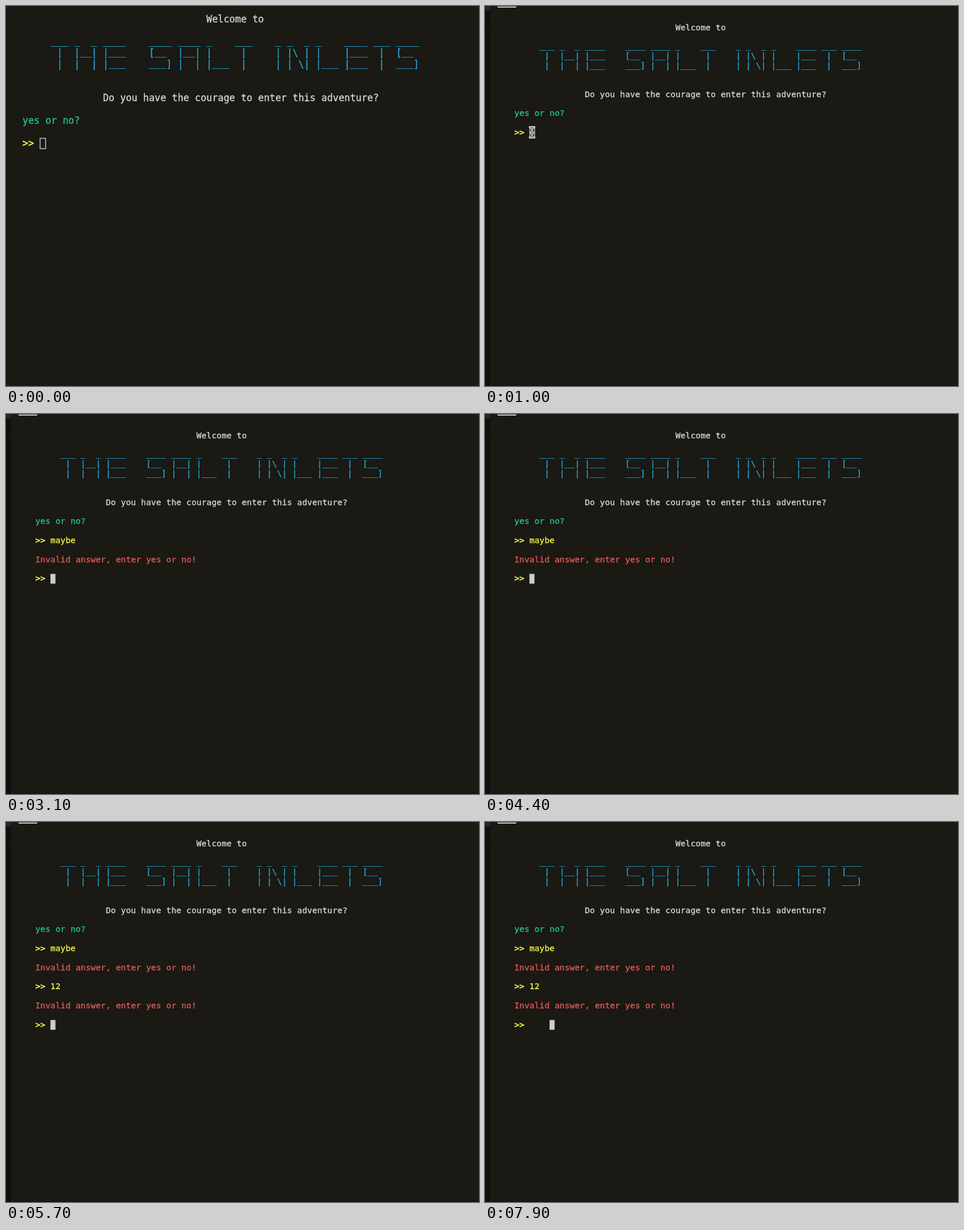
An HTML page with a canvas that plays this animation: 834x671 px, repeating every 8 s.

```html
<!DOCTYPE html>
<html lang="en">
<head>
<meta charset="utf-8">
<title>Text adventure</title>
<style>
html, body { margin: 0; width: 100%; height: 100%; overflow: hidden; background: #1a1914; }
canvas { display: block; }
</style>
</head>
<body>
<canvas id="stage" width="834" height="671"></canvas>
<script>
const LOOP = 8000;
const ctx = document.getElementById("stage").getContext("2d");
const BG = "#1a1914", WHITE = "#d8d8d6", CYAN = "#25a8d6";
const GREEN = "#24c88a", YELLOW = "#f2f045", RED = "#e25a57";

// Character grids: origin, first baseline, cell size and font size.
const ZOOMED = { x: 29, y: 29.4, w: 10.135, h: 19.86, size: 16.83 };
const NORMAL = { x: 51.7, y: 42.8, w: 8.877, h: 16.84, size: 14.74 };
const CUT = 300, FOCUS = 1200, HIDE_MOUSE = 1800;

const LETTERS = {
  T: ["___", " | ", " | "],
  H: ["_  _", "|__|", "|  |"],
  E: ["____", "|___", "|___"],
  S: ["____", "[__ ", "___]"],
  A: ["____", "|__|", "|  |"],
  L: ["_   ", "|   ", "|___"],
  I: ["_", "|", "|"],
  N: ["_  _", "|\\ |", "| \\|"]
};
const TITLE = [0, 1, 2].map(row => "THE SALT INLETS".split(" ")
  .map(word => [...word].map(c => LETTERS[c][row]).join(" ")).join("    "));

// Each prompt: row, keys with their times, and when Enter is pressed.
const PROMPTS = [
  { row: 11, text: "maybe", keys: [1900, 2000, 2100, 2200, 2400], enter: 2900 },
  { row: 15, text: "12", keys: [4700, 5000], enter: 5500 },
  { row: 19, text: "    ", keys: [7400, 7500, 7600, 7700], enter: Infinity }
];

let grid;

// A thin outline gives the text its slightly heavy terminal weight.
function write(text, col, row, color, weight = 0.3) {
  ctx.fillStyle = ctx.strokeStyle = color;
  ctx.lineWidth = weight;
  [...text].forEach((c, i) => {
    if (c === " ") return;
    const x = grid.x + (col + i) * grid.w;
    const lift = c === "_" ? grid.size * 0.09 : 0;
    const y = Math.round(grid.y + row * grid.h - lift);
    ctx.fillText(c, x, y);
    ctx.strokeText(c, x, y);
  });
}

function drawCursor(col, row, filled) {
  const x = grid.x + col * grid.w;
  const y = grid.y + row * grid.h - grid.size * 0.89;
  const h = grid.size * 1.17;
  if (filled) {
    ctx.fillStyle = "#cccccc";
    ctx.fillRect(x, y, grid.w, h);
  } else {
    ctx.strokeStyle = "#cccccc";
    ctx.lineWidth = 1.4;
    ctx.strokeRect(x + 0.7, y + 0.7, grid.w - 0.4, h - 1.4);
  }
}

function drawMouse(t) {
  const p = Math.min(1, Math.max(0, (t - 1200) / 400));
  const ease = p * p * (3 - 2 * p);
  ctx.save();
  ctx.translate(83 + 12 * ease, 223 + 69 * ease);
  const beam = new Path2D("M-4-9.2H-2Q0-9.2 0-7Q0-9.2 2-9.2H4M0-7V7M-4 9.2H-2Q0 9.2 0 7Q0 9.2 2 9.2H4M-2 1H2");
  ctx.lineCap = "round";
  for (const [color, width] of [["#f2f2f2", 3.6], ["#222222", 0.9]]) {
    ctx.strokeStyle = color;
    ctx.lineWidth = width;
    ctx.stroke(beam);
  }
  ctx.restore();
}

function drawWindowEdge() {
  const bars = [
    ["#100f0b", 0, 0, 9, 671],
    ["#262521", 0, 0, 9, 8],
    ["#201f1a", 0, 35, 9, 1],
    ["#e4e4e2", 22, 1, 33, 1.7],
    ["#100f0b", 9, 670, 825, 1]
  ];
  for (const [color, ...box] of bars) {
    ctx.fillStyle = color;
    ctx.fillRect(...box);
  }
}

function drawPrompts(t) {
  for (const { row, text, keys, enter } of PROMPTS) {
    write(">>", 0, row, YELLOW, 0.6);
    const typed = keys.filter(k => t >= k).length;
    for (let i = 0; i < typed; i++) {
      ctx.globalAlpha = t - keys[i] < 90 ? 0.5 : 1;
      write(text[i], 3 + i, row, YELLOW, t < enter ? 0.6 : 0.4);
    }
    ctx.globalAlpha = 1;
    if (t < enter) {
      drawCursor(3 + typed, row, t >= FOCUS);
      return;
    }
    write("Invalid answer, enter yes or no!", 0, row + 2, RED);
  }
}

function draw(t) {
  grid = t < CUT ? ZOOMED : NORMAL;
  ctx.fillStyle = BG;
  ctx.fillRect(0, 0, 834, 671);
  if (t >= CUT) drawWindowEdge();
  ctx.font = `${grid.size}px "DejaVu Sans Mono", monospace`;
  write("Welcome to", 32, 0, WHITE);
  TITLE.forEach((line, i) => write(line, 5, 2 + i, CYAN));
  write("Do you have the courage to enter this adventure?", 14, 7, WHITE);
  write("yes or no?", 0, 9, GREEN);
  drawPrompts(t);
  if (t >= CUT && t < HIDE_MOUSE) drawMouse(t);
}

const start = performance.now();
function tick() {
  draw((performance.now() - start) % LOOP);
  requestAnimationFrame(tick);
}
tick();
</script>
</body>
</html>
```
